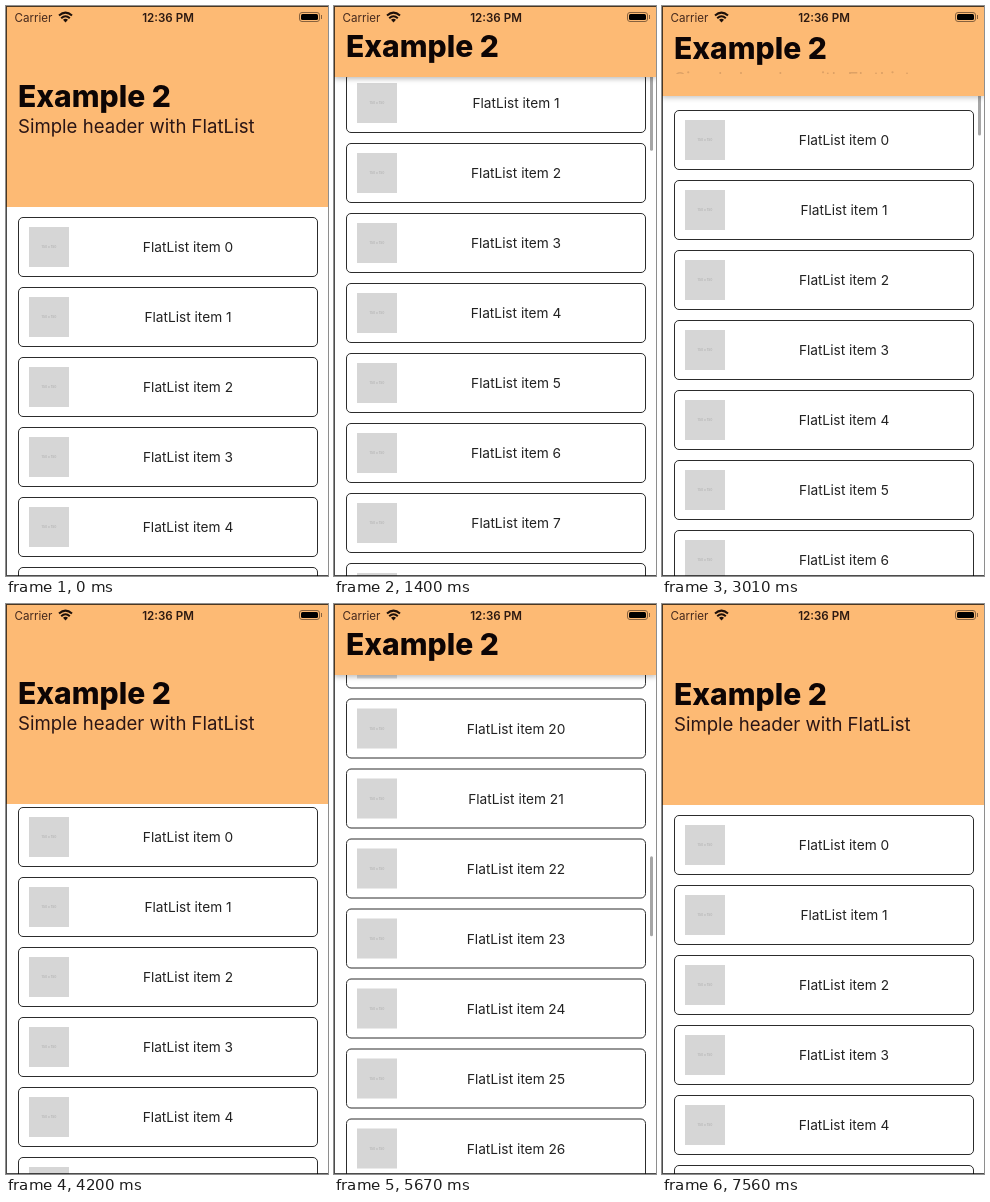
These frames come from a looping animation (322x570 px, 7.77 s). An HTML page:

```html
<!DOCTYPE html>
<html lang="en">
<head>
<meta charset="utf-8">
<title>Collapsing list header</title>
<style>
  html, body { margin: 0; width: 100%; height: 100%; overflow: hidden; background: #fff; }
  body { position: relative; font-family: Inter, Roboto, sans-serif; color: #222; }
  #stage { position: absolute; left: 0; top: 0; width: 322px; height: 570px; overflow: hidden; }
  #stage div, #stage svg { position: absolute; box-sizing: border-box; white-space: nowrap; }
  #list { left: 12px; top: 211px; width: 300px; }
  .card { left: 0; width: 300px; height: 60px; border: 1px solid #2c2c2c; border-radius: 5px; background: #fff; }
  .thumb { left: 10px; top: 9px; width: 40px; height: 40px; background: #d6d6d6; color: #aaa;
    font-size: 3.4px; line-height: 40px; text-align: center; }
  .label { left: 50px; width: 238px; top: 0; line-height: 58px; font-size: 13.7px; text-align: center; }
  #bar { left: 316px; top: 0; width: 3px; height: 80px; border-radius: 2px; background: #a6a6a6; }
  #header { left: 0; top: 0; width: 322px; background: #fdba74; }
  #title { left: 12px; top: -18px; line-height: 36px; font-size: 30px; font-weight: 800; color: #0d0505; }
  #sub { left: 12px; top: -14px; width: 290px; overflow: hidden; line-height: 28px; font-size: 18.6px; color: #2a1515; }
  .status { top: 2px; line-height: 20px; font-size: 11.6px; color: #45291d; }
  #clock { left: 102px; width: 120px; text-align: center; font-weight: 600; color: #2d1a12; }
  #battery { left: 293px; top: 6px; width: 21px; height: 10px; border: 1px solid #86613e; border-radius: 3px; }
  #charge { left: 1px; top: 1px; width: 17px; height: 6px; border-radius: 1.5px; background: #000; }
  #nub { left: 315px; top: 9px; width: 1px; height: 4px; background: #86613e; }
  #edge { left: 0; top: 0; width: 322px; height: 570px; border: solid rgba(0, 0, 0, .7); border-width: 1px 0 1px 1.5px; }
</style>
</head>
<body>
<div id="stage">
  <div id="list"></div>
  <div id="bar"></div>
  <div id="header">
    <div id="title">Example 2</div>
    <div id="sub">Simple header with FlatList</div>
  </div>
  <div class="status" style="left:8.5px">Carrier</div>
  <svg style="left:52px;top:5px" width="15" height="12" viewBox="0 0 15 12" fill="none" stroke="#1d100a" stroke-width="2">
    <path d="M1 4.6Q7.5 -1.4 14 4.6M3.2 7.2Q7.5 3.2 11.8 7.2"/>
    <path d="M5 8.8Q7.5 6.8 10 8.8L7.5 11.4Z" fill="#1d100a" stroke="none"/>
  </svg>
  <div class="status" id="clock">12:36 PM</div>
  <div id="battery"><div id="charge"></div></div>
  <div id="nub"></div>
  <div id="edge"></div>
</div>
<script>
  const LOOP = 7770, STEP = 70, LAG = 25;
  const TALL = 201, SHORT = 71, PITCH = 70, COUNT = 50;
  const $ = id => document.getElementById(id);
  const clamp = (v, lo, hi) => Math.min(hi, Math.max(lo, v));

  // time, scroll offset, velocity in px/ms
  const SCROLL = [
    [0, 0, 0], [630, 0, 0], [1000, 125, .45], [1400, 214, 0], [2310, 214, 0],
    [3010, 107, -.17], [3500, 0, 0], [4160, 0, 0], [4400, 300, 2.6],
    [4970, 1500, 1.2], [5400, 1720, 0], [5520, 1720, 0], [5800, 1150, -3],
    [6300, 90.5, 0], [6400, 90.5, 0], [6680, 0, 0], [LOOP, 0, 0]
  ];
  // header height, title centre, visible subtitle height
  const LAYOUT = [[71, 39.5, 0], [90, 42.5, 9], [110, 48.5, 17], [130, 54, 28], [201, 89.5, 28]];
  // scroll bar visible from, until
  const BAR = [[630, 1600], [2330, 3650], [4160, 6850]];

  const segment = (table, x) => {
    let i = 1;
    while (i < table.length - 1 && x > table[i][0]) i++;
    return [table[i - 1], table[i]];
  };

  function scrollAt(t) {
    const [a, b] = segment(SCROLL, Math.max(0, t));
    const d = b[0] - a[0], u = clamp((t - a[0]) / d, 0, 1), w = 1 - u;
    return a[1] * w * w * (1 + 2 * u) + a[2] * d * u * w * w
         + b[1] * u * u * (3 - 2 * u) - b[2] * d * u * u * w;
  }

  function layoutAt(h) {
    const [a, b] = segment(LAYOUT, h), u = (h - a[0]) / (b[0] - a[0]);
    return [1, 2].map(k => a[k] + (b[k] - a[k]) * u);
  }

  const barAlpha = t => Math.max(...BAR.map(([on, off]) =>
    clamp(Math.min((t - on) / 70, 1 - (t - off) / 280), 0, 1)));

  $("list").innerHTML = Array.from({ length: COUNT }, (_, i) =>
    `<div class="card" style="top:${i * PITCH}px"><div class="thumb">150 x 150</div>` +
    `<div class="label">FlatList item ${i}</div></div>`).join("");

  function draw(t) {
    const y = scrollAt(t);
    const h = clamp(TALL - scrollAt(t - LAG), SHORT, TALL);
    const fold = (TALL - h) / (TALL - SHORT);
    const [mid, subHeight] = layoutAt(h);
    $("list").style.transform = `translateY(${-Math.round(y * 2) / 2}px)`;
    $("bar").style.transform = `translateY(${34 + y * .144}px)`;
    $("bar").style.opacity = barAlpha(t);
    $("header").style.height = h + "px";
    $("header").style.boxShadow = `0 2px 5px rgba(0,0,0,${.26 * fold})`;
    $("title").style.transform = `translateY(${mid}px)`;
    $("sub").style.transform = `translateY(${mid + 30.5}px)`;
    $("sub").style.height = subHeight + "px";
    $("sub").style.opacity = 1 - fold;
  }

  const start = performance.now();
  function tick() {
    const t = (performance.now() - start) % LOOP;
    draw(Math.floor(t / STEP) * STEP);
    requestAnimationFrame(tick);
  }
  draw(0);
  requestAnimationFrame(tick);
</script>
</body>
</html>
```
